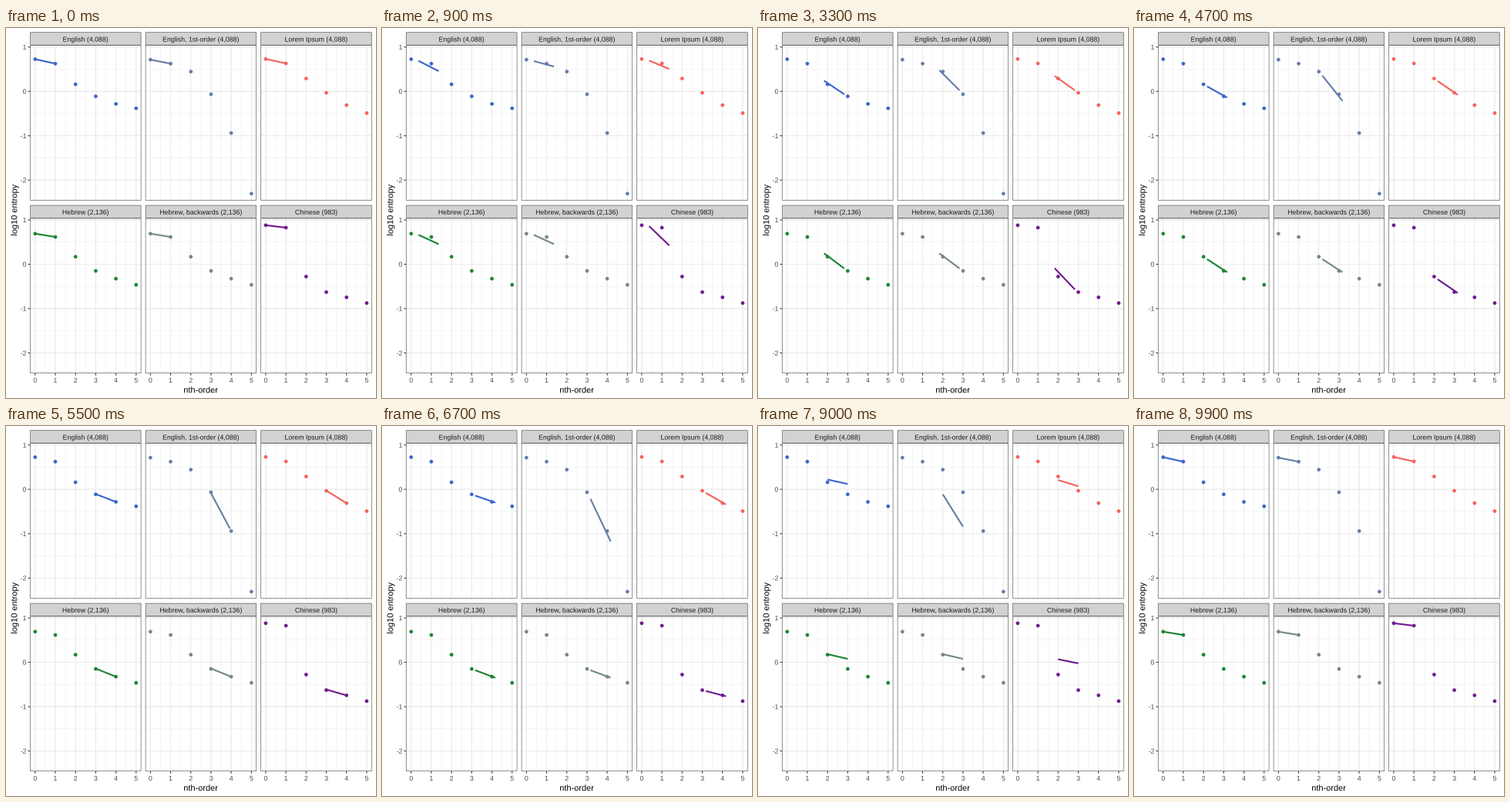
Animation, 480 px wide and 480 px high, one loop 10000 ms. Source, as a matplotlib script:

```python
import matplotlib.pyplot as plt
from matplotlib.animation import FuncAnimation
from matplotlib.patches import Circle, PathPatch, Rectangle
from matplotlib.textpath import TextPath
from matplotlib.transforms import Affine2D

plt.rcParams["font.family"] = "Liberation Sans"

SIZE = 480
FRAMES, INTERVAL = 100, 100
STATES = 5
STEP = FRAMES // STATES

LEFT, TOP = 31.25, 22.4
PANEL_W, PANEL_H = 144.08, 201.3
COL_STEP, ROW_STEP = PANEL_W + 5.5, 224.3
STRIP_H = 16.9
UNIT_X, UNIT_Y = PANEL_W / 5.5, 57.55
ORIGIN_X, ORIGIN_Y = UNIT_X / 4, 59.8  # data origin inside a panel

BORDER = "#333333"
STRIP = "#d2d2d2"
GRID = "#ebebeb"
TICK_TEXT = "#4d4d4d"

HEBREW = [0.69, 0.615, 0.17, -0.15, -0.325, -0.463]
SERIES = [
    ("English (4,088)", "#3a66cf",
     [0.725, 0.625, 0.16, -0.112, -0.282, -0.382]),
    ("English, 1st-order (4,088)", "#667ea8",
     [0.715, 0.625, 0.445, -0.065, -0.94, -2.305]),
    ("Lorem Ipsum (4,088)", "#f4635c",
     [0.73, 0.63, 0.29, -0.032, -0.31, -0.49]),
    ("Hebrew (2,136)", "#1b8533", HEBREW),
    ("Hebrew, backwards (2,136)", "#738a80", HEBREW),
    ("Chinese (983)", "#711b8c",
     [0.88, 0.825, -0.278, -0.628, -0.745, -0.875]),
]

fig = plt.figure(figsize=(SIZE / 72, SIZE / 72), dpi=72, facecolor="white")
ax = fig.add_axes([0, 0, 1, 1])
ax.set_xlim(0, SIZE)
ax.set_ylim(SIZE, 0)
ax.axis("off")


def stroke(xs, ys, color, width, z):
    line, = ax.plot(xs, ys, color=color, lw=width, zorder=z, snap=False,
                    solid_capstyle="butt")
    return line


def box(x, y, w, h, fill):
    """Rectangle whose thin border lies just inside its edge."""
    lw = 0.535
    ax.add_patch(Rectangle((x + lw / 2, y + lw / 2), w - lw, h - lw, fc=fill,
                           ec=BORDER, lw=lw, zorder=6, snap=False,
                           joinstyle="miter"))


def label(x, y, text, size, color, align=0.5, rotation=0):
    """Unhinted text; align is the share of its width left of x."""
    path = TextPath((0, 0), text, size=size)
    ink = path.get_extents()
    place = (Affine2D().translate(-ink.x0 - align * ink.width, 0)
             .scale(1, -1).rotate_deg(-rotation).translate(x, y))
    ax.add_patch(PathPatch(place.transform_path(path), fc=color, lw=0,
                           zorder=8, snap=False))


def draw_grid(x, y):
    for step, width in ((0.5, 0.53), (1, 1.07)):
        z = 1 + step
        for i in range(int(5 / step) + 1):
            gx = x + ORIGIN_X + i * step * UNIT_X
            stroke([gx, gx], [y, y + PANEL_H], GRID, width, z)
        for i in range(int(3 / step) + 1):
            gy = y + ORIGIN_Y - (1 - i * step) * UNIT_Y
            stroke([x, x + PANEL_W], [gy, gy], GRID, width, z)


def draw_panel(index, name, color, values):
    row, col = divmod(index, 3)
    x, y = LEFT + col * COL_STEP, TOP + row * ROW_STEP
    draw_grid(x, y)
    box(x, y, PANEL_W, PANEL_H, "none")
    box(x, y - STRIP_H, PANEL_W, STRIP_H, STRIP)
    label(x + PANEL_W / 2, y - 4.8, name, 8.8, "#1a1a1a")

    xs = [x + ORIGIN_X + i * UNIT_X for i in range(6)]
    ys = [y + ORIGIN_Y - v * UNIT_Y for v in values]
    for center in zip(xs, ys):
        ax.add_patch(Circle(center, 2.35, fc=color, lw=0, zorder=4))

    if col == 0:
        for v in (1, 0, -1, -2):
            ty = y + ORIGIN_Y - v * UNIT_Y
            stroke([x - 2.75, x], [ty, ty], BORDER, 1.07, 3)
            label(x - 5.2, ty + 3.15, str(v), 8.8, TICK_TEXT, align=1)
    if row == 1:
        base = y + PANEL_H
        for i, tx in enumerate(xs):
            stroke([tx, tx], [base, base + 2.75], BORDER, 1.07, 3)
            label(tx, base + 12, str(i), 8.8, TICK_TEXT)

    return stroke([], [], color, 2.13, 5), xs, ys


panels = [draw_panel(i, *s) for i, s in enumerate(SERIES)]
label(LEFT + (2 * COL_STEP + PANEL_W) / 2, 473.2, "nth-order", 11, "black")
label(14.3, TOP + (ROW_STEP + PANEL_H) / 2 + 0.7, "log10 entropy", 11,
      "black", rotation=90)


def cubic_in_out(p):
    return 4 * p ** 3 if p < 0.5 else 1 - 4 * (1 - p) ** 3


def update(frame):
    state, tick = divmod(frame, STEP)
    following = (state + 1) % STATES
    e = cubic_in_out(tick / STEP)

    def blend(points):
        return [points[state + k] * (1 - e) + points[following + k] * e
                for k in (0, 1)]

    for line, xs, ys in panels:
        line.set_data(blend(xs), blend(ys))
    return [line for line, _, _ in panels]


anim = FuncAnimation(fig, update, frames=FRAMES, interval=INTERVAL,
                     repeat=True, repeat_delay=0)
plt.show()
```
